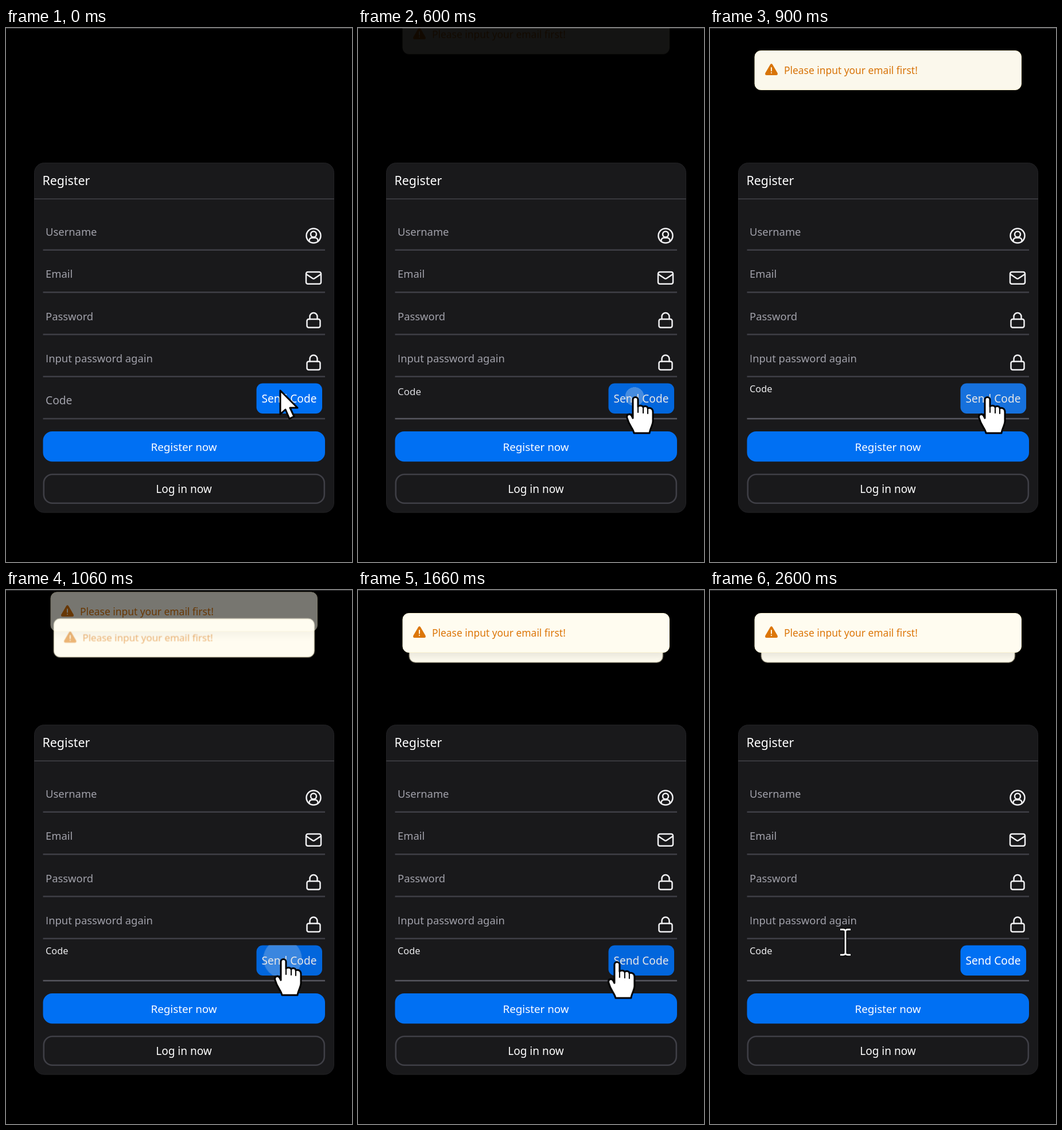
These frames come from a looping animation (603 px wide and 928 px high, 2630 ms). An HTML page:

```html
<!DOCTYPE html>
<html lang="en">
<head>
<meta charset="utf-8">
<title>Register form</title>
<style>
  html, body { margin: 0; width: 100%; height: 100%; overflow: hidden; background: #000; }
  svg { display: block; width: 100vw; height: 100vh; }
  text { font-family: "Noto Sans", "Open Sans", sans-serif; fill: #fff; }
  .sans { font-family: "Open Sans", sans-serif; }
  .label { font-size: 18.4px; fill: #a1a1aa; }
  .line { fill: #3f3f46; }
  .icon { fill: none; stroke: #f0f0f2; stroke-width: 2.5; stroke-linecap: round; stroke-linejoin: round; }
  .mid { text-anchor: middle; }
  .pointer { fill: #fff; stroke: #000; stroke-width: 3; stroke-linejoin: round; stroke-linecap: round; }

  .anim { animation: 2630ms linear infinite; }

  /* floating label of the focused field */
  #code { font-size: 19.2px; transform-origin: 69px 654px; animation-name: float; }
  @keyframes float {
    0%, 19.77% { transform: none; fill: #a1a1aa; animation-timing-function: cubic-bezier(0, 0, .2, 1); }
    27.38%, 100% { transform: translate(0, -21px) scale(.85); fill: #ececee; }
  }

  /* hovered underlines */
  #codeLine { animation-name: codeLine; }
  @keyframes codeLine {
    0%, 1.14% { fill: #3f3f46; }
    6.84%, 71.1% { fill: #56565f; }
    76.8%, 95.06% { fill: #3f3f46; }
    98.86%, 100% { fill: #56565f; }
  }
  #againLine { animation-name: againLine; }
  @keyframes againLine {
    0%, 70.34% { fill: #3f3f46; }
    74.52%, 95.06% { fill: #56565f; }
    98.86%, 100% { fill: #3f3f46; }
  }

  /* send button */
  #send { animation-name: hover; }
  @keyframes hover {
    0%, 1.14% { opacity: 1; }
    9.89%, 66.16% { opacity: .9; }
    74.52%, 100% { opacity: 1; }
  }
  .ripple { fill: #fff; opacity: 0; transform-origin: 482px 640.5px; }
  #ripple1 { animation-name: ripple1; }
  #ripple2 { animation-name: ripple2; }
  @keyframes ripple1 {
    0%, 20.15% { transform: scale(0); opacity: .35; }
    39.16%, 100% { transform: scale(1); opacity: 0; }
  }
  @keyframes ripple2 {
    0%, 34.79% { transform: scale(0); opacity: .35; }
    53.8%, 100% { transform: scale(1); opacity: 0; }
  }

  /* toasts */
  #toast1 { animation-name: drop1; }
  #toast2 { animation-name: drop2; }
  @keyframes drop1 {
    0%, 21.48% { transform: translate(0, -69px); opacity: 0; animation-timing-function: ease; }
    36.69%, 100% { transform: none; opacity: 1; }
  }
  @keyframes drop2 {
    0%, 36.12% { transform: translate(0, -69px); opacity: 0; animation-timing-function: ease; }
    51.33%, 100% { transform: none; opacity: 1; }
  }
  #behind { transform-origin: 310.3px 74.3px; animation-name: behind; }
  @keyframes behind {
    0%, 36.12% { transform: none; animation-timing-function: ease; }
    51.33%, 100% { transform: translate(0, 18.7px) scale(.95); }
  }
  #fade { animation-name: fade; }
  @keyframes fade {
    0%, 36.12% { opacity: 1; animation-timing-function: ease; }
    51.33%, 100% { opacity: 0; }
  }
  .panel { fill: #fffcf0; stroke: #fdf5d3; filter: drop-shadow(0 6px 8px rgba(0, 0, 0, .1)); }
  .warn, .warn text { fill: #dc7609; }

  /* mouse */
  #mouse { animation-name: move; }
  @keyframes move {
    0%, 1.14% { transform: translate(478px, 630px); animation-timing-function: ease-out; }
    9.89%, 54.37% { transform: translate(483px, 641px); }
    59.32% { transform: translate(460px, 645px); }
    63.12% { transform: translate(451px, 646px); }
    66.16% { transform: translate(436px, 650px); }
    72.24% { transform: translate(246px, 606px); }
    74.52%, 83.65% { transform: translate(231px, 609px); }
    89.73%, 95.06% { transform: translate(237px, 603px); }
    98.86%, 100% { transform: translate(236px, 612px); }
  }
  #mouse > g { animation-timing-function: step-end; }
  #arrow { animation-name: arrow; }
  #hand { animation-name: hand; }
  #beam { animation-name: beam; }
  @keyframes arrow { 0% { opacity: 1; } 2.28%, 100% { opacity: 0; } }
  @keyframes hand { 0% { opacity: 0; } 2.28% { opacity: 1; } 66.16%, 100% { opacity: 0; } }
  @keyframes beam { 0% { opacity: 0; } 66.16%, 100% { opacity: 1; } }
</style>
</head>
<body>
<svg viewBox="0 0 603 928" preserveAspectRatio="none">
  <defs>
    <clipPath id="sendClip"><rect x="436.5" y="617.5" width="114.5" height="52.5" rx="11"/></clipPath>
    <g id="lock">
      <rect x="524.5" y="506" width="23" height="14.5" rx="3"/>
      <path d="M529.5 506V501.500a6.500 6.500 0 0 1 13 0V506"/>
    </g>
    <g id="notice" class="warn">
      <path d="M105 64.500q2-3 4 0l8.500 14.500q1.500 4-2 4H98.500q-3.500 0-2-4z"/>
      <path d="M107 70v5.500M107 78.800v.2" fill="none" stroke="#fffcf0" stroke-width="1.9" stroke-linecap="round"/>
      <text x="129" y="80.500" font-size="17.4">Please input your email first!</text>
    </g>
    <rect id="panel" class="panel" x="78" y="40.500" width="464.500" height="68" rx="10.500"/>
    <path id="ibeam" d="M-9-22h5q4 0 4 4V18q0 4-4 4h-5M9-22H4q-4 0-4 4M0 18q0 4 4 4h5" fill="none"/>
  </defs>

  <rect width="603" height="928"/>
  <rect width="603" height="1" fill="#3a3a3b"/>

  <!-- card -->
  <rect x="49.500" y="234.500" width="522" height="607.500" rx="17" fill="#19191b" stroke="#222225"/>
  <text x="63.500" y="273" font-size="21.4">Register</text>
  <rect x="49" y="296" width="523" height="2" fill="#38383d"/>

  <text class="label" x="69" y="361">Username</text>
  <text class="label" x="69" y="434">Email</text>
  <text class="label" x="69" y="507.500">Password</text>
  <text class="label" x="69" y="581"><tspan class="sans">I</tspan>nput password again</text>
  <text class="label anim" id="code" x="69" y="654">Code</text>

  <g class="line">
    <rect x="64.500" y="384.500" width="491.500" height="2.500"/>
    <rect x="64.500" y="458" width="491.500" height="2.500"/>
    <rect x="64.500" y="531.300" width="491.500" height="2.500"/>
    <rect class="anim" id="againLine" x="64.500" y="604.500" width="491.500" height="2.500"/>
    <rect class="anim" id="codeLine" x="64.500" y="677.700" width="491.500" height="2.500"/>
  </g>

  <g class="icon">
    <circle cx="536" cy="361" r="12.500"/>
    <circle cx="536" cy="358.500" r="5"/>
    <path d="M528.500 371v-1.500a5 5 0 0 1 5-5h5a5 5 0 0 1 5 5V371"/>
    <rect x="523" y="424" width="26" height="20.800" rx="3"/>
    <path d="M523.500 428l11 7.300q1.500 1 3 0l11-7.300"/>
    <use href="#lock"/>
    <use href="#lock" y="73.400"/>
  </g>

  <!-- buttons -->
  <g class="anim" id="send">
    <rect x="436.500" y="617.500" width="114.500" height="52.500" rx="11" fill="#0070f3"/>
    <text class="mid" x="493.500" y="650.500" font-size="19.1">Send Code</text>
    <g clip-path="url(#sendClip)">
      <circle class="ripple anim" id="ripple1" cx="482" cy="640.500" r="115"/>
      <circle class="ripple anim" id="ripple2" cx="482" cy="640.500" r="115"/>
    </g>
  </g>
  <rect x="64.500" y="701" width="491.500" height="52.500" rx="16" fill="#0070f3"/>
  <text class="mid" x="310" y="734.500" font-size="18.8">Register now</text>
  <rect x="65.800" y="775.800" width="489" height="50" rx="15" fill="none" stroke="#3f3f46" stroke-width="2.600"/>
  <text class="mid" x="310" y="807.500" font-size="19">Log in now</text>

  <!-- toasts -->
  <g class="anim" id="behind">
    <g class="anim" id="toast1">
      <use href="#panel"/>
      <g class="anim" id="fade"><use href="#notice"/></g>
    </g>
  </g>
  <g class="anim" id="toast2">
    <use href="#panel"/>
    <use href="#notice"/>
  </g>

  <!-- mouse -->
  <g class="anim" id="mouse">
    <g class="anim pointer" id="arrow"><path d="M0 0V41l9-8 7 16 8-4-7-15h13z"/></g>
    <g class="anim pointer" id="hand">
      <path d="M-4 5a4.500 4.500 0 0 1 9 0V17c2-3 8-2 9 1 2-3 8-2 8 2 3-2 9 0 9 6V42c0 7-5 13-6 21H-2c-2-9-8-12-12-26-2-7 5-9 8-4l2 4z"/>
      <path d="M5 17v10M14 19v9M22 21v8" stroke-width="2"/>
    </g>
    <g class="anim" id="beam">
      <use href="#ibeam" stroke="#000" stroke-width="6"/>
      <use href="#ibeam" stroke="#fff" stroke-width="2.800"/>
    </g>
  </g>
</svg>
</body>
</html>
```
